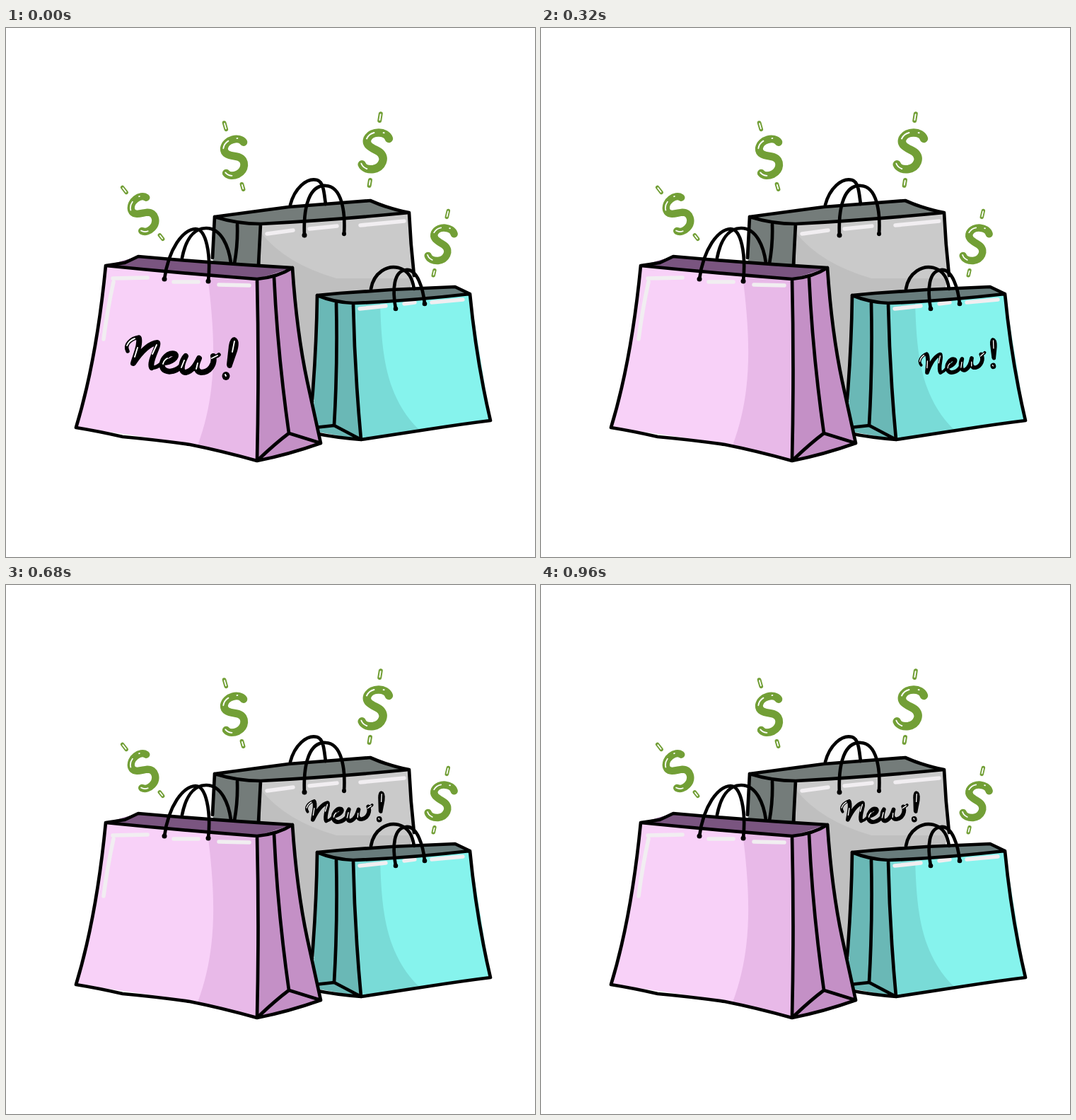
These frames come from a looping animation (748 by 748 pixels, 1000 ms). An HTML page:

```html
<!DOCTYPE html>
<html lang="en">
<head>
<meta charset="utf-8">
<title>Shopping bags</title>
<style>
html, body { margin: 0; width: 100%; height: 100%; overflow: hidden; background: #fff; }
svg { display: block; width: 100vw; height: 100vh; }
.ink, .shine, .ess { fill: none; stroke-linecap: round; stroke-linejoin: round; }
.ink { stroke: #000; stroke-width: 4.7; }
.shine { stroke: #f1eef1; stroke-width: 5.5; }
.ess { stroke: #729f36; }
.glint { fill: none; stroke: #fff; stroke-width: 1.9; stroke-linecap: round; }
.pose1 .a, .pose0 .b { display: none; }
</style>
</head>
<body>
<svg id="stage" viewBox="0 0 748 748" class="pose0">
<defs>
  <g id="curl">
    <path class="ess" stroke-width="11.5" d="M17-20C12-30-9-28-13-15C-15-4-2-3 7 1C18 7 14 22 2 26C-5 28-12 27-15 22"/>
    <path class="glint" d="M-14-15Q-12-22-5-25M-16 21Q-13 26-7 27M8-27h1"/>
  </g>
  <g id="bars">
    <path class="ess" stroke-width="6" d="M0-53V-43M0 42V50"/>
    <path class="glint" d="M0-52V-44M0 43V49"/>
  </g>
  <g id="new">
    <g class="ink">
      <path style="stroke-width:5.5" d="M172 457C167 447 177 439 188 437"/>
      <path style="stroke-width:8" d="M188 439C190 449 183 463 180 474C188 462 201 446 214 445C217 449 202 471 206 480"/>
      <path style="stroke-width:5.5" d="M206 480C213 482 218 475 224 471"/>
      <path style="stroke-width:8" d="M222 473C234 473 243 465 239 461C231 457 219 468 221 479C224 489 239 487 248 478C249 472 250 468 254 464C248 476 246 487 254 487C264 485 269 475 273 467C268 478 268 486 276 487C288 487 296 475 293 464"/>
      <path style="stroke-width:5.5" d="M293 463Q297 466 301 462"/>
    </g>
    <path d="M323 437Q332 440 327 457L319 480Q313 483 312 476L315 449Q317 437 323 437Z"/>
    <ellipse cx="311" cy="492" rx="5.5" ry="6"/>
    <path class="glint" d="M171 449Q174 442 182 439M213 448L207 461M186 452L182 465M222 475Q223 470 228 467M252 470L248 480M271 474L269 482M291 467L299 463M323 443L320 458M310 490l1 2"/>
  </g>
</defs>

<g id="dollars">
  <g transform="translate(194 263) rotate(-38) scale(.9)">
    <use href="#bars"/><use href="#curl" transform="rotate(8)"/>
  </g>
  <g transform="translate(322.500 182.500) rotate(-16) scale(.95)">
    <use href="#bars"/><use href="#curl" transform="rotate(8)"/>
  </g>
  <g transform="translate(521.500 173.500) rotate(9)">
    <use href="#bars"/><use href="#curl"/>
  </g>
  <g transform="translate(614.500 305.500) rotate(13) scale(.91)">
    <use href="#bars"/><use href="#curl"/>
  </g>
</g>

<!-- grey bag -->
<g>
  <path fill="#747c7a" d="M295 267L400 253L515 244L570 261L360 277V350H292Z"/>
  <path fill="#bfbfbf" d="M360 277L570 261L577 352L560 400L441 400L432 528L360 500Z"/>
  <path class="a" fill="#cacaca" d="M360 277L570 261L577 354H467Q395 333 361 290Z"/>
  <path class="b" fill="#cacaca" d="M360 277L570 261L576 346Q530 355 472 356L400 321L360 290Z"/>
  <path class="ink a" d="M292 325L295 267L400 253L515 244Q542 256 570 261Q572 305 577 350M295 267Q327 277 360 277Q470 271 570 261M327 278Q328 305 323 333M360 277L357 335M432 525l1 3"/>
  <path class="ink b" d="M293 325L297 267L400 252L514 243Q542 256 570 261Q571 305 576 350M297 267Q330 277 360 277Q470 270 570 261M329 278Q328 305 324 332M360 277L357 335M432 524v4"/>
  <path class="shine a" d="M369 291L406 286M429 284L468 280M501 279L563 273"/>
  <path class="shine b" d="M369 289L409 284M428 283L467 279M498 278L558 273"/>
  <path class="ink" d="M402 250C408 227 425 211 440 215C450 218 450 238 452 249M422 294C420 250 430 222 452 223C475 224 480 260 478 292"/>
  <circle cx="422" cy="293" r="3.5"/><circle cx="478" cy="291" r="3"/>
</g>

<!-- blue bag -->
<g class="a">
  <path fill="#687c7c" d="M440 378L545 370L635 366L656 376L491 390Z"/>
  <path fill="#6ab8b6" d="M440 378L491 390L502 582L434 570Z"/>
  <path fill="#86f3ed" d="M491 390L656 376L685 555Q600 565 502 582Z"/>
  <path fill="#79dbd7" d="M491 390L529 387C531 455 535 520 584 568L502 582Z"/>
  <path class="shine" d="M500 397L537 393M563 390L578 388M602 388L646 384"/>
  <path class="ink" d="M433 525Q439 450 440 378L472 375L545 370L635 366L656 376Q665 470 685 555Q645 560 600 567T502 582Q465 579 436 573M440 378Q464 388 491 389Q570 386 656 376M491 390Q493 485 502 582M467 389Q469 475 464 562M437 565L464 562L502 582"/>
</g>
<g class="b">
  <path fill="#687c7c" d="M444 379L545 371L630 367L656 376L490 390Z"/>
  <path fill="#6ab8b6" d="M444 379L490 390L502 581L434 570Z"/>
  <path fill="#86f3ed" d="M490 390L656 376L683 553Q600 565 502 581Z"/>
  <path fill="#79dbd7" d="M490 390L529 388C531 455 537 520 583 568L502 581Z"/>
  <path class="shine" d="M504 399L533 396M563 393L576 391M605 390L644 386"/>
  <path class="ink" d="M433 529Q436 450 444 379L472 375L545 371L630 367L656 376Q666 470 683 553L600 567Q550 573 502 581Q465 575 436 572M444 379Q464 388 490 389Q570 385 656 376M490 390Q494 485 502 581M468 389Q470 475 464 562M437 565L464 562L502 581"/>
</g>
<path class="ink" d="M516 369C520 345 540 335 555 339C570 343 575 355 577 369M551 397C546 370 548 343 566 342C582 341 590 370 592 390"/>
<circle cx="551" cy="397" r="3.3"/><circle cx="592" cy="390" r="3.3"/>

<!-- pink bag -->
<g class="a">
  <path fill="#7a5580" d="M141 336L187 323L405 339L355 355Z"/>
  <path fill="#c490c6" d="M355 355L405 339Q416 470 445 587L355 612Z"/>
  <path fill="#f8d1f8" d="M141 336Q250 347 355 355V612Q305 598 260 589T99 565Q128 470 141 336Z"/>
  <path fill="#e8b9e8" d="M285 350C295 430 301 510 271 590Q310 597 355 612V355Z"/>
  <path class="shine" d="M151 354L200 353M152 359Q143 400 138 440M237 359L272 359M301 363L344 364"/>
  <path class="ink" d="M141 336L168 332L187 323Q300 333 405 339Q411 430 426 500L445 587Q400 603 355 612Q305 598 260 589Q210 582 165 578Q130 570 99 565Q128 470 141 336Q250 347 355 355Q385 352 405 339M355 355Q358 480 355 612Q380 588 400 573L445 587M379 352Q384 460 400 573"/>
</g>
<g class="b">
  <path fill="#7a5580" d="M143 336L185 322L405 338L353 355Z"/>
  <path fill="#c490c6" d="M353 355L405 338Q416 470 444 587L356 609Z"/>
  <path fill="#f8d1f8" d="M143 336Q250 345 353 355L356 609Q305 597 260 588T101 565Q115 460 143 336Z"/>
  <path fill="#e8b9e8" d="M290 349C300 430 309 510 268 589Q310 596 356 609L353 355Z"/>
  <path class="shine" d="M150 353L201 353M149 355Q143 400 137 441M236 359L270 359M302 362L338 363"/>
  <path class="ink" d="M143 336L162 332Q173 323 187 322Q300 333 405 338Q412 420 424 490L444 587Q400 604 356 609Q305 597 260 588Q210 583 165 577L101 565Q115 460 143 336Q250 345 353 355Q385 352 405 338M353 355Q355 480 356 609L400 574L444 587M379 352Q386 460 400 574"/>
</g>
<path class="ink" d="M224 355C230 312 250 285 268 284C283 284 290 320 286 358M249 325C254 300 265 283 283 283C305 283 315 310 318 332"/>
<circle cx="224" cy="355" r="3.5"/><circle cx="286" cy="358" r="3.5"/>

<use id="label" href="#new" role="img" aria-label="New!"/>
</svg>
<script>
const stage = document.getElementById('stage');
const label = document.getElementById('label');
const dollars = document.getElementById('dollars');

// Moves the lettering, pivoting on its first letter.
const place = (x, y, turn, size) =>
  `translate(${x} ${y}) rotate(${turn}) scale(${size}) translate(-195 -460)`;

const spots = [
  place(195, 460, 0, 1),
  place(554, 475, -13.5, .71),
  place(443, 320.5, -8.2, .71)
];

function draw(now) {
  const step = Math.floor(now % 1000 / 160);
  const pose = step % 2;
  stage.setAttribute('class', 'pose' + pose);
  label.setAttribute('transform', spots[Math.min(2, step >> 1)]);
  dollars.setAttribute('transform', `translate(${pose * .5} ${pose * .5})`);
}

const start = performance.now();
function tick() {
  draw(performance.now() - start);
  requestAnimationFrame(tick);
}
tick();
</script>
</body>
</html>
```
